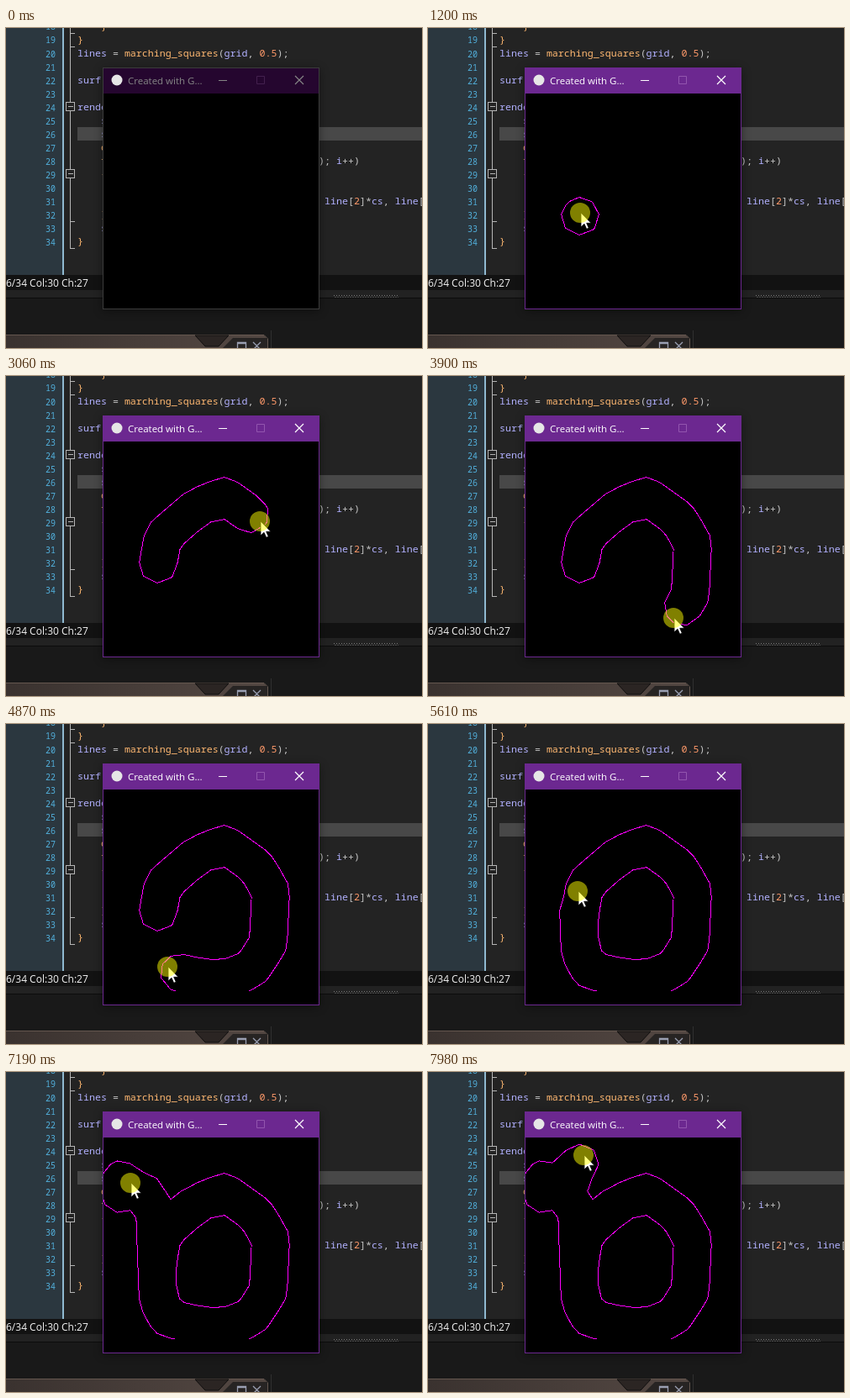
Write an HTML page that moves like this. It is 495 px wide and 381 px high and loops after 8 s.

```html
<!DOCTYPE html>
<html lang="en">
<head>
<meta charset="utf-8">
<title>Marching squares brush</title>
<style>
  html, body { margin: 0; width: 100%; height: 100%; overflow: hidden; background: #171717; }
  svg { display: block; }
  .code text { font: 11.65px "Noto Sans Mono", "DejaVu Sans Mono", monospace; white-space: pre; }
  .code .num { font-size: 10px; fill: #52b0dc; text-anchor: end; }
  .ui { font: 12px "Open Sans", "Noto Sans", sans-serif; }
  .title { font-size: 11.5px; }
  .v { fill: #b2b1ff; } .f { fill: #ffb871; } .n { fill: #ff9a6a; } .p { fill: #c8c8c8; }
  #win { --bar: #25062f; --edge: #3c3c3c; --ink: #858585; --off: #43204e; }
  #win.on { --bar: #6c2890; --edge: #6c2890; --ink: #fff; --off: #9255ae; }
</style>
</head>
<body>
<svg width="495" height="381" viewBox="0 0 495 381">
  <defs>
    <linearGradient id="tab"><stop stop-color="#3a322f"/><stop offset="1" stop-color="#544843"/></linearGradient>
    <pattern id="dots" x="390" y="318" width="3" height="4" patternUnits="userSpaceOnUse">
      <path d="M0 0h1v1h-1zM1.5 2h1v1h-1z" fill="#777"/>
    </pattern>
    <filter id="soft" x="-20%" y="-20%" width="140%" height="140%"><feGaussianBlur stdDeviation="6"/></filter>
  </defs>

  <rect width="495" height="294" fill="#232323"/>
  <rect width="68" height="294" fill="#2b373f"/>
  <rect x="67" width="2" height="294" fill="#8fb9d0"/>
  <rect x="85" y="118" width="410" height="16" fill="#484848"/>
  <path id="folds" fill="none" stroke="#b4b4b4" shape-rendering="crispEdges"/>
  <g class="code" id="code"></g>

  <rect y="294" width="495" height="18" fill="#121212"/>
  <text class="ui" y="308" fill="#f2f2f2">6/34 Col:30 Ch:27</text>
  <rect y="312" width="495" height="10" fill="#222"/>
  <rect y="321" width="495" height="1" fill="#0c0c0c"/>
  <rect x="390" y="318" width="77" height="4" fill="url(#dots)"/>
  <rect y="322" width="495" height="59" fill="#191919"/>
  <rect x="315" y="360" width="1" height="21" fill="#303030"/>
  <path d="M0 366H307L311 370V381H0z" fill="url(#tab)"/>
  <path d="M0 365.5H307L311.5 370V381" fill="none" stroke="#65574f"/>
  <path d="M225 366h40l-12 13h-16z" fill="#2b2523" stroke="#0f0e0e"/>
  <path d="M258 381L270 369H311V381z" fill="#272423"/>
  <path d="M275.5 381v-6.5h10v6.5M275 375.5h11M294 374l9 9M303 374l-9 9" fill="none" stroke="#9a9fb2" stroke-width="1.3"/>

  <g id="win">
    <rect x="115" y="49" width="258" height="288" opacity=".4" filter="url(#soft)"/>
    <rect x="115.5" y="47.5" width="257" height="287" style="stroke:var(--edge)"/>
    <rect x="116" y="48" width="256" height="30" style="fill:var(--bar)"/>
    <circle cx="132" cy="62" r="6.5" fill="#e6e6e6"/>
    <text class="ui title" x="145" y="67" style="fill:var(--ink)">Created with G...</text>
    <g fill="none" style="stroke:var(--ink)">
      <path d="M253 62.5h10" shape-rendering="crispEdges"/>
      <path d="M344 57l10 10M354 57l-10 10" stroke-width="1.2"/>
      <path d="M298.5 57.5h9v9h-9z" style="stroke:var(--off)"/>
    </g>
  </g>
  <path id="contour" fill="none" stroke="#f0f" shape-rendering="crispEdges"/>
  <g id="cursor">
    <path d="M1 0V17L5 13.3L7.7 19.3L10.3 18.2L7.7 12.3H13z" fill="#fff" stroke="#000" stroke-width=".8"/>
    <circle id="press" r="12" fill="#ff0" opacity=".5"/>
  </g>
</svg>

<script>
const $ = id => document.getElementById(id);
const LOOP = 8000, APPEAR = 180, PRESS = 970;
const LEFT = 116, TOP = 78, CELL = 16, SIZE = 16;
const LAG = 150, RADIUS = 22.5, DROP = 4; // brush trails the pointer and sits a little lower

// Editor text: line number, column, then class-prefixed runs
const code = [
  [18, 4, "f}"], [19, 0, "f}"],
  [20, 0, "vlines", "p = ", "fmarching_squares", "p(", "vgrid", "p, ", "n0.5", "p);"],
  [22, 0, "vsurf"], [24, 0, "vrende"], [25, 4, "vs"], [26, 4, "vs"], [27, 4, "fd"], [28, 4, "ff"],
  [28, 41, "p); ", "vi", "p++)"], [29, 4, "f{"],
  [31, 42, "vline", "p[", "n2", "p]*", "vcs", "p, ", "vline", "p["],
  [32, 4, "f}"], [33, 4, "vs"], [34, 0, "f}"]
];
const baseline = n => 34 + (n - 20) * 16.03;
let markup = "";
for (let n = 18; n <= 34; n++) markup += `<text class="num" x="59" y="${baseline(n) + .5}">${n}</text>`;
for (const [n, col, ...runs] of code)
  markup += `<text x="${85 + col * 7}" y="${baseline(n)}">` +
    runs.map(r => `<tspan class="${r[0]}">${r.slice(1)}</tspan>`).join("") + "</text>";
$("code").innerHTML = markup;

const foldBox = y => `M71.5 ${y - 5}h10v10h-10zM74 ${y}h6`;
const foldEnd = n => `M76.5 ${230.5 + (n - 32) * 16}h5`;
$("folds").setAttribute("d", "M76.5 0V88M76.5 99V168M76.5 179V262.5" +
  [93.5, 173.5].map(foldBox).join("") + [18, 19, 32, 34].map(foldEnd).join(""));

// Pointer key points: time, x, y
const keys = [
  [APPEAR, 366, 357], [820, 181, 218], [PRESS, 181, 220], [1250, 181, 220], [1780, 187, 187],
  [2050, 224, 155], [2220, 235, 149], [2575, 260, 139], [3000, 298, 166], [3250, 315, 195],
  [3640, 312, 258], [3900, 292, 288], [4120, 270, 298], [4400, 236, 299], [4870, 192, 289],
  [5100, 181, 268], [5900, 177, 160], [6150, 164, 139], [6350, 145, 134], [6740, 136, 124],
  [7000, 136, 141], [7600, 174, 113], [7980, 185, 99]
];
function pointerAt(t) {
  const k = keys.findIndex(key => key[0] > t);
  if (k <= 0) return keys.at(k).slice(1);
  const [t0, x0, y0] = keys[k - 1], [t1, x1, y1] = keys[k], u = (t - t0) / (t1 - t0);
  return [x0 + (x1 - x0) * u, y0 + (y1 - y0) * u];
}

function strokeUntil(t) {
  const end = Math.max(PRESS, t - LAG);
  const path = keys.filter(([s]) => s >= PRESS && s < end).map(key => key.slice(1));
  return [...path, pointerAt(end)].map(([x, y]) => [x, y + DROP]);
}

function segmentDistance(x, y, [x0, y0], [x1, y1]) {
  const dx = x1 - x0, dy = y1 - y0, length2 = dx * dx + dy * dy || 1;
  const u = Math.max(0, Math.min(1, ((x - x0) * dx + (y - y0) * dy) / length2));
  return Math.hypot(x - x0 - dx * u, y - y0 - dy * u);
}

// Positive inside the painted stroke, negative outside
function fieldAt(stroke) {
  return Array.from({ length: SIZE }, (_, j) => Array.from({ length: SIZE }, (_, i) => {
    const x = LEFT + i * CELL, y = TOP + j * CELL;
    const distance = Math.min(...stroke.map((p, k) => segmentDistance(x, y, stroke[Math.max(0, k - 1)], p)));
    return { x, y, value: RADIUS - distance };
  }));
}

function crossing(a, b) {
  if (a.value > 0 === b.value > 0) return null;
  const u = a.value / (a.value - b.value);
  return `${(a.x + (b.x - a.x) * u).toFixed(1)} ${(a.y + (b.y - a.y) * u).toFixed(1)}`;
}

function contourAt(t) {
  if (t < PRESS) return "";
  const grid = fieldAt(strokeUntil(t));
  let d = "";
  for (let j = 0; j < SIZE - 1; j++) for (let i = 0; i < SIZE - 1; i++) {
    const corners = [grid[j][i], grid[j][i + 1], grid[j + 1][i + 1], grid[j + 1][i]];
    const hits = corners.map((c, k) => crossing(c, corners[(k + 1) % 4])).filter(Boolean);
    for (let k = 0; k < hits.length; k += 2) d += `M${hits[k]}L${hits[k + 1]}`;
  }
  return d;
}

function draw(t) {
  const [x, y] = pointerAt(t), pressed = t >= PRESS;
  $("win").setAttribute("class", pressed ? "on" : "");
  $("contour").setAttribute("d", contourAt(t));
  $("cursor").setAttribute("transform", `translate(${Math.round(x)} ${Math.round(y)})`);
  $("cursor").setAttribute("visibility", t >= APPEAR ? "visible" : "hidden");
  $("press").setAttribute("visibility", pressed ? "inherit" : "hidden");
}
const start = performance.now();
function tick() {
  draw((performance.now() - start) % LOOP);
  requestAnimationFrame(tick);
}
tick();
</script>
</body>
</html>
```
